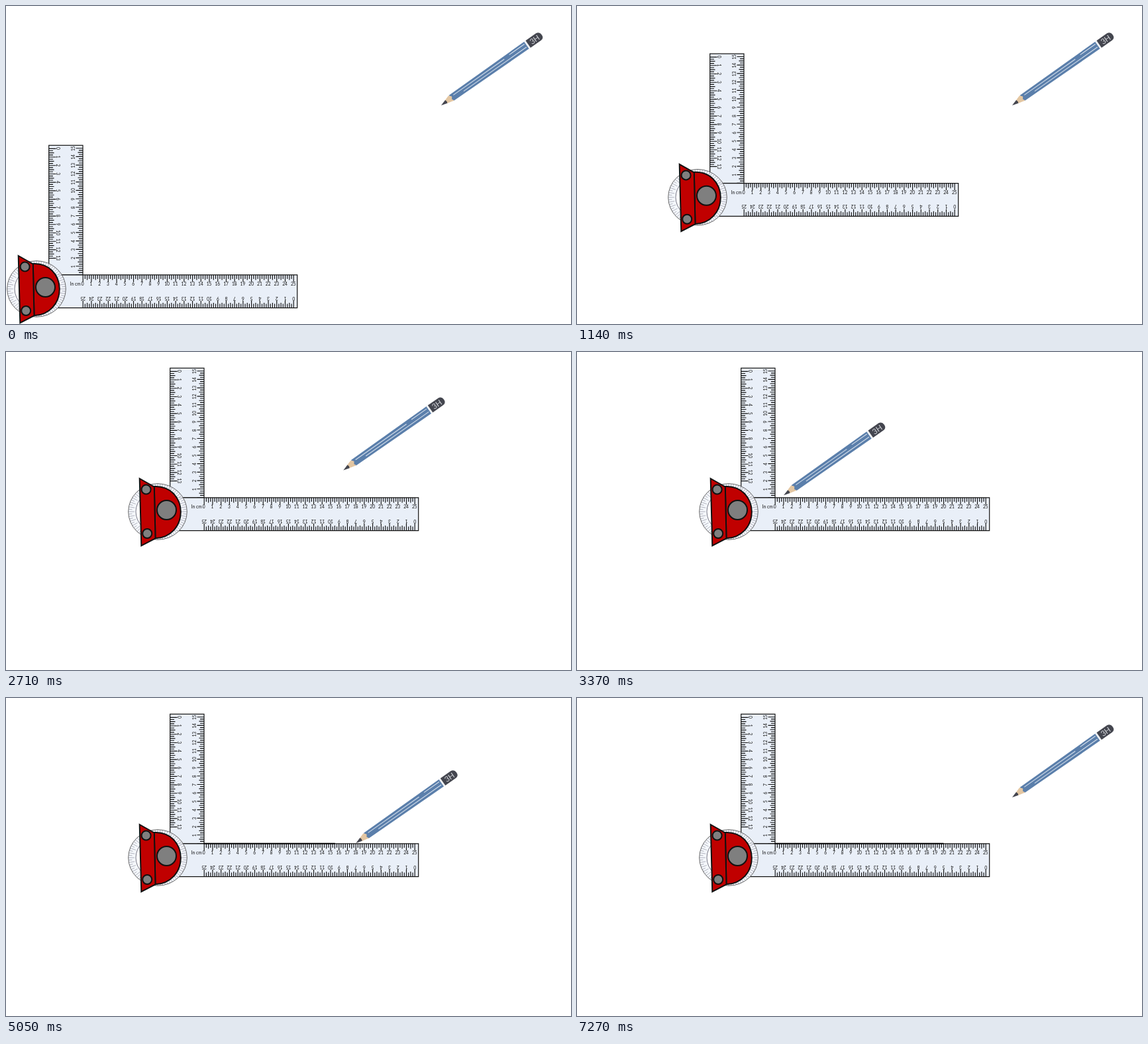
These frames come from a looping animation (853x480 px, 7.33 s). An HTML page:

```html
<!DOCTYPE html>
<html lang="en">
<head>
<meta charset="utf-8">
<style>
html, body { margin: 0; width: 100%; height: 100%; overflow: hidden; background: #fff; }
svg { display: block; width: 853px; height: 480px; }
text { font-family: Lato, "Open Sans", sans-serif; text-anchor: middle; }
#marks text { font-size: 6.7px; fill: #111; }
</style>
</head>
<body>
<svg viewBox="0 0 853 480">
  <g id="square">
    <g fill="#e9eff8" stroke="#111" stroke-width="1.2">
      <rect x="64.7" y="210.3" width="51.3" height="195.4"/>
      <path d="M60 405.8H439.7V455.6H60"/>
    </g>
    <g id="marks"><path id="ticks" stroke="#111" stroke-width="1.15"/></g>
    <ellipse cx="46" cy="427" rx="44.3" ry="42.3" fill="#f4f7fc" fill-opacity=".85" stroke="#555" stroke-width=".9"/>
    <path id="dial" stroke="#778" stroke-width=".55"/>
    <ellipse cx="46" cy="427" rx="33" ry="31.5" fill="#fff" stroke="#556" stroke-width=".8"/>
    <g fill="#c00000" stroke="#111" stroke-width="2" stroke-linejoin="miter">
      <path d="M40.8 389C64 387.500 80.500 405 80.800 427C81 449 65 466.500 42.500 467.300Z"/>
      <path d="M18.700 377L40.800 389.500L42.500 467.300L21.300 478.300Z"/>
      <g fill="#7f7f7f">
        <circle cx="28.600" cy="393.600" r="7"/>
        <circle cx="30.200" cy="460" r="7"/>
        <circle cx="59.500" cy="424.500" r="14.500"/>
      </g>
    </g>
  </g>
  <path id="line" stroke="#000" stroke-width="1.600"/>
  <g id="pencil">
    <path d="M18 -5.700L158 -6.700V6.200L20 5.300L17 2L20 -1.500Z" fill="#5b7fab"/>
    <path d="M9 -2.900L17.500 -5.700L21 -1.800L18.500 1.800L20.500 5.300L9 2.600Z" fill="#e3c6a2"/>
    <path d="M0 0L9.500 -3L10.500 0L9.500 2.700Z" fill="#45464f"/>
    <path d="M24 -2.300H118M40 2H156M128 -3.500H156" stroke="#d3deeb" stroke-width="1.100"/>
    <path d="M159 -6.700V6.200" stroke="#eef1f4" stroke-width="2.500"/>
    <path d="M160.500 -6.800H180Q185.500 -6 185.500 0Q185.500 6 180 6.300H160.500Z" fill="#44464f"/>
    <text x="172.500" y="4" font-size="11.500" fill="#d5d7dc">3H</text>
  </g>
</svg>
<script>
const $ = id => document.getElementById(id);
const LOOP = 7330, STEP = 60, CM = 12.72;
const marks = $("marks");

function label(text, x, y, turn = 0) {
  const el = document.createElementNS("http://www.w3.org/2000/svg", "text");
  el.textContent = text;
  el.setAttribute("transform", `translate(${x} ${y}) rotate(${turn})`);
  el.setAttribute("y", 2.4);
  marks.append(el);
}

// Quarter-centimetre ticks, longer at halves and whole centimetres
function scale(cm, draw) {
  let d = "";
  for (let i = 0; i <= cm * 4; i++) {
    d += draw(i * CM / 4, i % 4 ? (i % 2 ? 6 : 7.5) : 10.5);
  }
  return d;
}

$("ticks").setAttribute("d",
  scale(25, (p, n) => `M${116.2 + p} 406v${n}M${116.2 + p} 455.500v${-n}`) +
  scale(13, (p, n) => `M65 ${215.300 + p}h${n}`) +
  scale(15, (p, n) => `M116 ${405.500 - p}h${-n}`));

for (let i = 0; i <= 25; i++) {
  label(i, 115.8 + i * CM, 420);
  label(25 - i, 116.2 + i * CM, 441, 180);
}
for (let i = 0; i <= 13; i++) label(i, 78.3, 215 + i * CM, 90);
for (let i = 1; i <= 15; i++) label(i, 101.5, 406 - i * CM, -90);
label("In cm", 104.7, 420);

let dial = "";
for (let a = 0; a < 360; a += 5) {
  const c = Math.cos(a * Math.PI / 180), s = Math.sin(a * Math.PI / 180);
  const r = a % 10 ? .88 : .8;
  dial += `M${46 + 44 * c} ${427 + 42 * s}L${46 + 44 * r * c} ${427 + 42 * r * s}`;
}
$("dial").setAttribute("d", dial);

const part = (t, start, length) => Math.min(1, Math.max(0, (t - start) / length));
const sine = u => (1 - Math.cos(Math.PI * u)) / 2;
const quad = u => u < .5 ? 2 * u * u : 1 - 2 * (1 - u) ** 2;

function draw(now) {
  const t = Math.floor(now % LOOP / STEP) * STEP;
  const slide = sine(part(t, 174, 1460));
  $("square").setAttribute("transform", `translate(${183 * slide} ${-186 * slide})`);

  const approach = quad(part(t, 1964, 1623));
  const stroke = quad(part(t, 3780, 1615));
  const back = quad(part(t, 5580, 1620));
  const x = 657 - 359 * approach + 255 * stroke + 104 * back;
  const y = 150 + 69 * (approach - back);
  $("pencil").setAttribute("transform", `translate(${x} ${y}) rotate(-35.07)`);

  const drawn = 255 * part(t, 3780, 1620);
  $("line").setAttribute("d", drawn ? `M298.500 219.600h${drawn}` : "");
  requestAnimationFrame(() => draw(performance.now() - begin));
}
const begin = performance.now();
draw(0);
</script>
</body>
</html>
```
